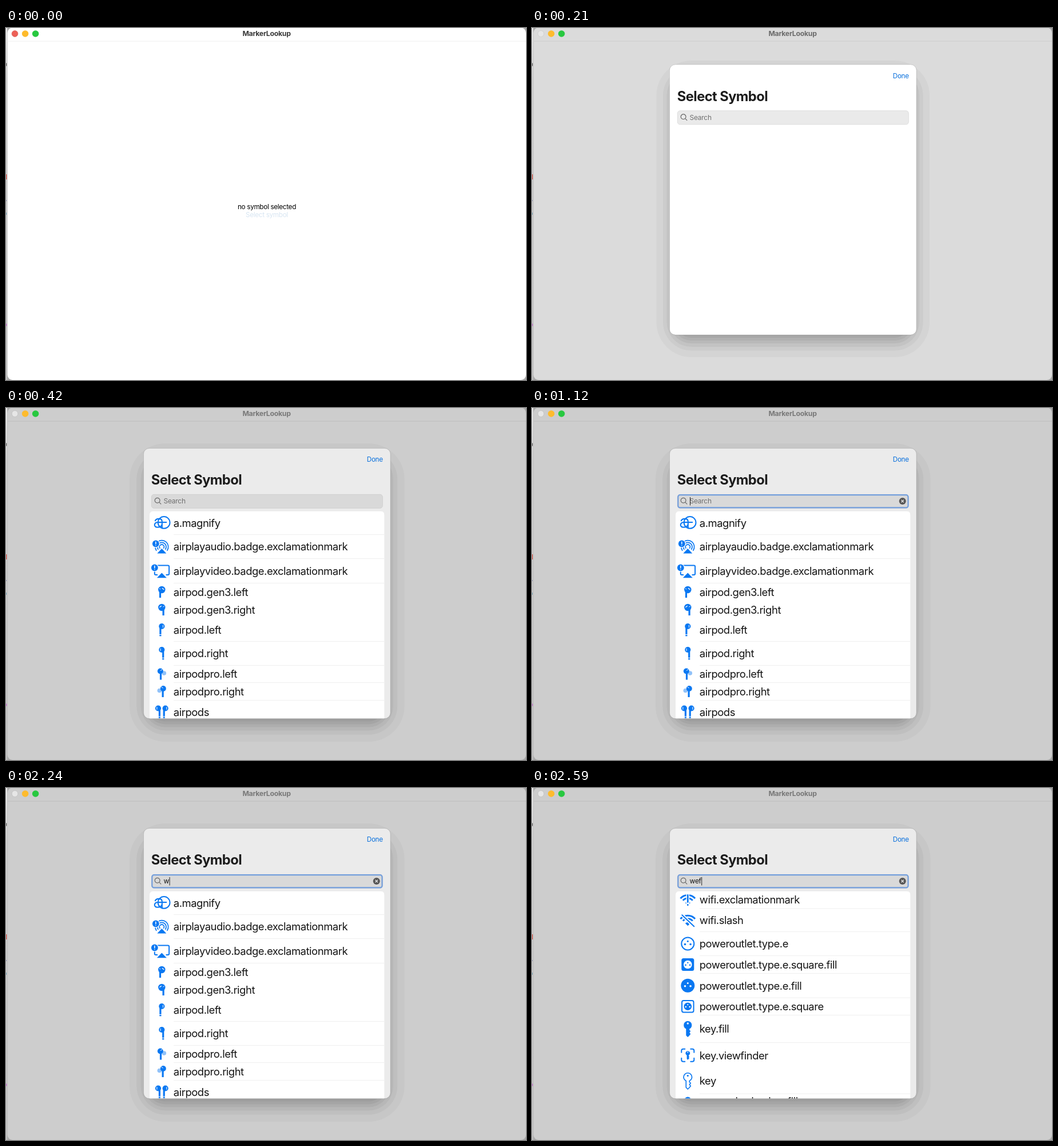
Animation, 909 px wide and 616 px high, one loop 2.73 s. Source, as an HTML page:

```html
<!DOCTYPE html>
<html lang="en">
<head>
<meta charset="utf-8">
<title>Symbol picker</title>
<style>
  html, body { margin: 0; width: 100%; height: 100%; overflow: hidden; background: #c6c6c6; }
  svg { display: block; width: 909px; height: 616px; }
  text { font-family: Inter, "Open Sans", sans-serif; font-size: 11.65px; letter-spacing: -.024em; white-space: pre; }
  .mid { text-anchor: middle; }
  .row { font-size: 18.4px; fill: #151515; }
  .title { font-size: 12.3px; font-weight: 700; }
  .heading { font-size: 23.7px; font-weight: 700; fill: #1c1c1c; }
  #query { font-size: 12px; }
  .ink { fill: #0a78f2; }
  .line { fill: none; stroke: #0a78f2; stroke-width: 2; stroke-linecap: round; stroke-linejoin: round; }
  .paper { fill: #fff; }
</style>
</head>
<body>
<svg viewBox="0 0 909 616" xmlns="http://www.w3.org/2000/svg">
  <defs>
    <linearGradient id="edge" x2="0" y2="1">
      <stop offset="0" stop-color="#f2f2f2"/>
      <stop offset=".15" stop-color="#d6d6d6"/>
      <stop offset="1" stop-color="#c6c6c6"/>
    </linearGradient>
    <clipPath id="listClip"><path d="M251 473V117q0-7 7-7H654.5q7 0 7 7V473Z"/></clipPath>
  </defs>

  <rect width="909" height="616" fill="#a9a9a9"/>
  <rect width="2" height="616" fill="url(#edge)"/>
  <g>
    <rect y="61.5" width="1.2" height="5" fill="#555"/>
    <rect y="256" width="1.2" height="9" fill="#d0453a"/>
    <rect y="301" width="1" height="2" fill="#8b8fb5"/>
    <rect y="323" width="1" height="4" fill="#6e9fb5"/>
    <rect y="517.5" width="1.2" height="4" fill="#c65fd0"/>
  </g>
  <rect id="window" x="2.5" y="-.5" width="906.5" height="616.5" rx="9"/>
  <rect id="rule" x="2.5" y="22.6" width="906.5" height="1"/>

  <text class="mid" x="456" y="316.5" fill="#000">no symbol selected</text>
  <text id="open" class="mid" x="456" y="331" fill="#d7e5f2">Select symbol</text>

  <circle id="close" cx="15.5" cy="10" r="5.4" stroke-width=".6"/>
  <circle cx="33.6" cy="10" r="5.8" fill="#febb2d"/>
  <circle cx="51.6" cy="10" r="5.8" fill="#28c840"/>
  <text id="title" class="mid title" x="455.5" y="13.7">MarkerLookup</text>

  <g id="sheet">
    <g id="shadow"></g>
    <rect id="panel" x="240.5" width="431.5" height="473" rx="10" stroke="#000" stroke-opacity=".16" stroke-width=".8"/>
    <text x="630.8" y="23.5" fill="#0a70dc">Done</text>
    <text class="heading" x="253.8" y="63.8">Select Symbol</text>
    <rect id="field" x="254.3" y="80.8" width="404" height="24" rx="4.5"/>
    <g id="focus">
      <rect x="255.3" y="81.7" width="402.2" height="22.2" rx="3.5" fill="none" stroke="#749fdd" stroke-width="2.2"/>
      <circle cx="647.7" cy="92.5" r="6" fill="#555"/>
      <path d="M645.5 90.3l4.4 4.4m0-4.4l-4.4 4.4" stroke="#e2e2e2" stroke-width="1.3"/>
    </g>
    <path d="M268.2 94.9l3 3M269 91.3a4.4 4.4 0 1 1-8.8 0a4.4 4.4 0 1 1 8.8 0" fill="none" stroke="#666" stroke-width="1.2"/>
    <text id="query" x="275.6" y="96.7"></text>
    <rect id="caret" width="1" y="85.500" height="14.5" fill="#222"/>
    <g id="list" clip-path="url(#listClip)">
      <rect x="251" y="109.5" width="410.5" height="364" fill="#fff"/>
      <g id="all"></g>
      <g id="partial"></g>
      <g id="matches"></g>
    </g>
  </g>
</svg>
<script>
const LOOP = 2730, STEP = 70;
const $ = id => document.getElementById(id);
const set = (id, attrs) => Object.entries(attrs).forEach(([k, v]) => $(id).setAttribute(k, v));
const show = (id, on) => { $(id).style.display = on ? "" : "none"; };

// Icon pieces, centred on 0,0
const path = (d, cls = "line", extra = "") => `<path class="${cls}" d="${d}" ${extra}/>`;
const stroke = (d, width, color = "#0a78f2", cap = "round") =>
  path(d, "line", `style="stroke:${color};stroke-width:${width};stroke-linecap:${cap}"`);
const disc = (x, y, r, cls = "ink", extra = "") => `<circle class="${cls}" cx="${x}" cy="${y}" r="${r}" ${extra}/>`;
const box = (s, r, cls) => `<rect class="${cls}" x="${-s / 2}" y="${-s / 2}" width="${s}" height="${s}" rx="${r}"/>`;
const at = (x, y, body, scale = 1) => `<g transform="translate(${x} ${y}) scale(${scale})">${body}</g>`;
const flip = body => `<g transform="scale(-1 1)">${body}</g>`;
const badge = (x, y) => disc(x, y, 7.2, "paper") + disc(x, y, 5.9) +
  stroke(`M${x} ${y - 3.2}v3.6m0 2.6v.1`, 1.5, "#fff");
const arc = (r, y, half) => {
  const dx = r * Math.sin(half), dy = y - r * Math.cos(half);
  return `M${-dx} ${dy}A${r} ${r} 0 ${half > Math.PI / 2 ? 1 : 0} 1 ${dx} ${dy}`;
};

const stem = (x, y, h) => stroke(`M${x} ${y}v${h}`, 3.2, "#0a78f2", "butt");
const pod = disc(0, -6.5, 5.1) + stroke("M2.2-8.500v4", 1, "#fff") + stem(-2.4, -4, 11.5) + stem(-2.4, 8.5, 2.3);
const podGen3 = disc(0, -4, 6.2) + stroke("M1-6.500l2.500 2", 1.3, "#fff") + stroke("M-4-6l1.500 1", 1, "#fff") + stem(-2.8, -2, 12);
const podPro = disc(4, -1.5, 3.8, "ink", 'opacity=".45"') + disc(-2.5, -5, 5) +
  stroke("M-2-6l2.500-2", 1, "#fff") + stem(-1.8, -2, 12);

const sockets = cls => disc(-4.8, 1, 1.8, cls) + disc(4.8, 1, 1.8, cls) + disc(0, -4.3, 1.5, cls);
const wifi = stroke(arc(17, 9, .85) + arc(11.5, 9, .83), 3, "#0a78f2", "butt") +
  path("M0 10l-4.5-4.5a6.4 6.4 0 0 1 9 0z", "ink");
const gap = d => stroke(d, 5.5, "#fff");
const keyShape = "M-3 0A7.2 7.2 0 1 1 3 0V2L5 4L3 6.5L5 9L3 11.5L0 14.5L-3 11.5Z";
const keyFill = path(keyShape, "ink") + disc(0, -9.5, 1.7, "paper");
const keyLine = stroke(keyShape, 1.7) + disc(0, -9, 1.6);

const icons = {
  "a.magnify": disc(3.8, -.3, 10.4, "line") +
    stroke("M-11.5-3.5C-9.5-8 .5-8.500 .5-2V8.500M8-.8H-6C-14.5-.8-14.500 8-7.5 8C-3 8 .5 5.500 .5 2", 2.1),
  "airplayaudio.badge.exclamationmark": stroke([4, 7.7, 11.4].map(r => arc(r, .5, 2.15)).join(""), 1.7) +
    path("M-9.5 13L0 2.5L9.5 13Z", "paper") + path("M-8 12L0 3.5L8 12Z", "ink") + badge(-10.5, -5),
  "airplayvideo.badge.exclamationmark": path("M-8 7H-10.5Q-12.5 7-12.5 5V-7.5Q-12.5-9.5-10.5-9.5H10.8Q12.8-9.5 12.8-7.5V5Q12.8 7 10.8 7H8") +
    path("M-10 13L0 2.2L10 13Z", "paper") + path("M-8.5 12.3L0 3.5L8.5 12.3Z", "ink") + badge(-12.5, -5.5),
  "airpod.gen3.left": podGen3,
  "airpod.gen3.right": flip(podGen3),
  "airpod.left": pod,
  "airpod.right": flip(pod),
  "airpodpro.left": podPro,
  "airpodpro.right": flip(podPro),
  "airpods": at(-6.3, 0, flip(pod)) + at(6.3, 0, pod),
  "wifi.exclamationmark": wifi + gap("M0-8V10") + stroke("M0-8V4M0 9v.3", 2.8),
  "wifi.slash": wifi + gap("M-10-9L11 11") + path("M-10-9L11 11"),
  "poweroutlet.type.e": disc(0, 0, 11, "line") + sockets("ink"),
  "poweroutlet.type.e.square.fill": box(22, 3.5, "ink") + disc(0, 0, 7.3, "paper") + at(0, 0, sockets("ink"), .78),
  "poweroutlet.type.e.fill": disc(0, 0, 12) + sockets("paper"),
  "poweroutlet.type.e.square": box(20.5, 3, "line") + disc(0, 0, 6.8) + at(0, 0, sockets("paper"), .72),
  "key.fill": keyFill,
  "key.viewfinder": path("M-11-5V-8Q-11-11-8-11H-5M5-11H8Q11-11 11-8V-5M11 5V8Q11 11 8 11H5M-5 11H-8Q-11 11-11 8V5") + at(0, 0, keyFill, .55),
  "key": keyLine,
  "person.badge.key.fill": disc(0, -2.5, 5.5)
};

// name, row height, whether a divider shows below
const all = [
  ["a.magnify", 41.5, 1], ["airplayaudio.badge.exclamationmark", 42, 1],
  ["airplayvideo.badge.exclamationmark", 43, 1], ["airpod.gen3.left", 31, 0],
  ["airpod.gen3.right", 31, 0], ["airpod.left", 40, 1], ["airpod.right", 42, 1],
  ["airpodpro.left", 30, 1], ["airpodpro.right", 31, 1], ["airpods", 41, 0]
];
const matches = [
  ["wifi.exclamationmark", 31, 1], ["wifi.slash", 40.5, 1], ["poweroutlet.type.e", 42, 1],
  ["poweroutlet.type.e.square.fill", 31, 1], ["poweroutlet.type.e.fill", 42.5, 1],
  ["poweroutlet.type.e.square", 30.5, 1], ["key.fill", 48, 1], ["key.viewfinder", 44.5, 0],
  ["key", 45, 1], ["person.badge.key.fill", 27, 0]
];
const partial = [...matches.slice(2, 6), ...matches.slice(0, 2), ...matches.slice(6)];

function fill(id, rows) {
  let y = 109.5;
  $(id).innerHTML = rows.map(([name, height, divider]) => {
    const mid = y + height / 2;
    y += height;
    return at(272.3, mid, icons[name]) +
      `<text class="row" x="292.8" y="${mid + 6.9}">${name}</text>` +
      (divider ? `<rect x="293" y="${y - .5}" width="368.5" height="1" fill="#f0f0f0"/>` : "");
  }).join("");
}
fill("all", all);
fill("partial", partial);
fill("matches", matches);

function drawShadow(spread) {
  const bands = [[spread, .033], [spread / 2, .04], [5, .045], [-1, .05], [-6, .05], [-11, .05]];
  $("shadow").innerHTML = bands.map(([e, a]) =>
    `<rect x="${240.5 - e}" y="${16 - e}" width="${431.5 + 2 * e}" height="${473 + 2 * e}" rx="${38 + e}" opacity="${a}"/>`).join("");
}

const grey = v => `rgb(${v},${v},${v})`;
const dim = [0, .15, .4, .72, .9, .97, 1];
const titleTone = [58, 60, 66, 107, 116, 120, 121];
const opacity = [0, .5, .88, 1, 1, 1, 1];
let lastSpread;

function render(t) {
  const s = Math.min(6, Math.floor(t / STEP));
  const base = 255 - Math.round(50 * dim[s]);
  const loaded = s >= 5, focused = t >= 1120;
  const query = t < 2240 ? "" : t < 2380 ? "w" : t < 2520 ? "we" : "wef";

  set("window", { fill: grey(base) });
  set("rule", { fill: grey(base - 14) });
  set("title", { fill: grey(titleTone[s]) });
  set("close", s < 2
    ? { fill: "#ed6158", stroke: "#d2534b" }
    : { fill: s < 3 ? "#e1e1e1" : "#e6e6e6", stroke: grey(base - 20) });
  show("open", s < 2);

  show("sheet", s > 0);
  const y = s < 6 ? 70.5 - 17.5 * Math.pow(.37, s - 2) : 70.5;
  set("sheet", { transform: `translate(0 ${y.toFixed(2)})`, opacity: opacity[s] });
  const spread = s < 3 ? 34.5 : s < 4 ? 23 : 24.5;
  if (spread !== lastSpread) drawShadow(lastSpread = spread);
  set("panel", { fill: loaded ? "#ebebeb" : "#fff" });
  set("field", { fill: loaded ? "#d9d9d9" : "#eaeaea", stroke: loaded ? "#d0d0d0" : "#dedede" });

  show("focus", focused);
  $("query").textContent = query || "Search";
  set("query", { fill: query ? "#111" : "#707070" });
  show("caret", focused && (t < 1680 || query));
  set("caret", { x: query ? 276 + $("query").getComputedTextLength() : 276 });

  show("list", loaded);
  show("all", t < 2310);
  show("partial", t >= 2310 && t < 2590);
  show("matches", t >= 2590);
}

const start = performance.now();
function tick() {
  render((performance.now() - start) % LOOP);
  requestAnimationFrame(tick);
}
render(0);
requestAnimationFrame(tick);
</script>
</body>
</html>
```
